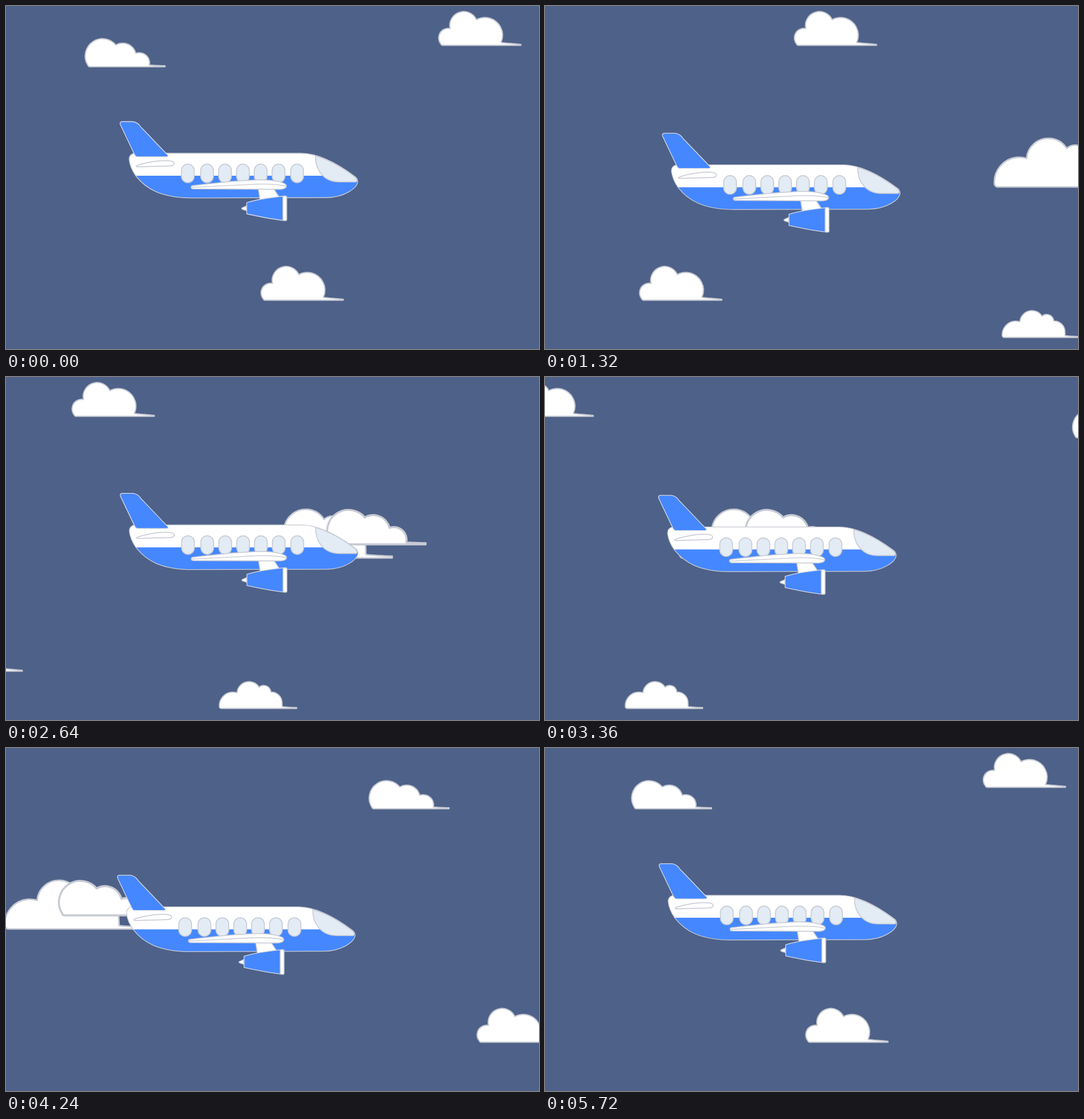
Write an HTML page with a canvas that moves like this. It is 900 by 580 pixels and loops after 5.76 s.

```html
<!DOCTYPE html>
<html lang="en">
<head>
<meta charset="utf-8">
<title>Plane in the clouds</title>
<style>
  html, body { margin: 0; width: 100%; height: 100%; overflow: hidden; background: #4e6188; }
  canvas { display: block; }
</style>
</head>
<body>
<canvas id="stage" width="900" height="580"></canvas>
<script>
const ctx = document.getElementById('stage').getContext('2d');
const LOOP = 5760, STEP = 40, HALF = LOOP / 2;
const SKY = '#4e6188', BLUE = '#4587ff', GLASS = '#e3ebf4', LINE = '#c6cad3', WHITE = '#fff';

// Upper crossing point of two circles [x, y, r]
function crossing([x1, y1, r1], [x2, y2, r2]) {
  const d = Math.hypot(x2 - x1, y2 - y1);
  const ux = (x2 - x1) / d, uy = (y2 - y1) / d;
  const a = (r1 * r1 - r2 * r2 + d * d) / (2 * d);
  const h = Math.sqrt(r1 * r1 - a * a);
  return [x1 + a * ux + h * uy, y1 + a * uy - h * ux];
}

// A cloud is a row of bumps on a flat base, with a thin tail on the right
function cloudPath({ bumps, base, width, tailY, tailX, endAngle }) {
  const p = new Path2D();
  const [fx, fy, fr] = bumps[0];
  let angle = Math.PI - Math.asin((base - 2.5 - fy) / fr);
  bumps.forEach((b, i) => {
    const [x, y, r] = b;
    const next = bumps[i + 1];
    const q = next && crossing(b, next);
    p.arc(x, y, r, angle, q ? Math.atan2(q[1] - y, q[0] - x) : endAngle);
    if (q) angle = Math.atan2(q[1] - next[1], q[0] - next[0]);
  });
  p.lineTo(tailX, tailY);
  p.quadraticCurveTo(tailX + 4, tailY + 0.7, width - 1.5, base - 1.6);
  p.lineTo(width - 1.5, base);
  const left = fx - fr * Math.cos(Math.asin((base - 2.5 - fy) / fr));
  p.lineTo(left + 3, base);
  p.quadraticCurveTo(left + 1, base, left, base - 2.5);
  p.closePath();
  return p;
}

const tall = cloudPath({
  bumps: [[17, 46, 16.3], [43, 25, 23.6], [78.5, 41.5, 30]],
  base: 58.5, width: 141, tailX: 106, tailY: 53.7, endAngle: 0.41
});
const sloped = cloudPath({
  bumps: [[30, 30.7, 29.3], [64, 31.5, 22.8], [92, 42.5, 17.5]],
  base: 48.7, width: 137, tailX: 109, tailY: 45.7, endAngle: 0.18
});
const wide = cloudPath({
  bumps: [[24, 42, 23.2], [51, 21.5, 20.3], [76, 19.5, 12], [88.4, 37, 18.4]],
  base: 46.5, width: 133, tailX: 107, tailY: 43.3, endAngle: 0
});

// x is the place at time `at`; speeds in px per ms
const clouds = [
  { path: tall, x: 378.2, y: 8, at: 1500, speed: 0.2345, line: 2 },
  { path: tall, x: 430, y: 439, at: 0, speed: 0.2053, before: 0.24, line: 2 },
  { path: wide, x: 384.3, y: 514, at: 2560, speed: 0.312, line: 1.8 },
  { path: sloped, x: 133, y: 54, at: 0, speed: 0.3155, line: 2 },
  { path: wide, x: 330.1, y: 221.6, at: 2960, speed: 0.2605, line: 2.6, scale: 1.815 },
  { path: sloped, x: 365.8, y: 222.9, at: 3260, speed: 0.283, line: 3.4, scale: 1.235 }
];

function drawCloud({ path, x, y, at, speed, before = speed, line, scale = 1 }, t) {
  const u = (t - at + LOOP + HALF) % LOOP - HALF;
  ctx.save();
  ctx.translate(x - u * (u < 0 ? before : speed), y);
  ctx.scale(scale, scale);
  paint(path, WHITE, line / scale);
  ctx.restore();
}

function paint(path, fill, width = 1.5, stroke = LINE) {
  if (fill) {
    ctx.fillStyle = fill;
    ctx.fill(path);
  }
  ctx.lineWidth = width;
  ctx.strokeStyle = stroke;
  ctx.stroke(path);
}

const shape = d => new Path2D(d);
const body = shape('M217 249H498C530 249 566 271 590 289Q594 292 594 298C592 309 570 324 540 324' +
  'L316 324.6C262 325 236 309 219 287C212 277 209 268 208 260Q207.500 251 217 249Z');
const cockpit = shape('M522.500 253.500C522 278 537 297.500 563 297.500H591Q595 295 589 289C568 273 546 260 522.500 253.500Z');
const fin = shape('M196 195.500H212Q220 195.500 225 201Q228 205.500 232 209L273 252Q275 255 270 255' +
  'H222Q219 255 217 251L193 200.500Q191.500 196 196 195.500Z');
const stabilizer = shape('M222 269.500C235 265 255 261.500 268 261.500Q284 261.500 284 266Q284 270.500 276 270.500L222 272Q217.500 271.500 222 269.500Z');
const pylon = shape('M426 309H452L462 324L429 328Z');
const engine = shape('M406.500 332.500C420 328 445 324 468 321.500V362.500C445 360 420 354.500 406.500 351.500Z');
const nozzle = shape('M406 338L398.500 341.500Q397 342.500 399 343.700L406 346Z');
const wing = shape('M314 304C350 299.500 400 294.500 430 294C455 294 473.500 299 473.500 304C473.500 309 468 310 460 310L316 309.300Q312.500 309 312.500 306.500Q312.500 304.500 314 304Z');
const wingFold = shape('M314 306.700L420 301.300C445 300.500 462 302 473 304.500');
const intake = new Path2D();
intake.roundRect(467.5, 321.3, 6.5, 41.7, 2);
const windows = [307, 339.5, 369.8, 400, 430, 460.2, 491.5].map(x => {
  const p = new Path2D();
  p.roundRect(x - 10.8, 267.3, 21.6, 31.5, 10.8);
  return p;
});

function drawPlane(dx, dy) {
  ctx.save();
  ctx.translate(dx, dy);
  ctx.fillStyle = WHITE;
  ctx.fill(body);
  ctx.save();
  ctx.clip(body);
  ctx.fillStyle = BLUE;
  ctx.fillRect(200, 287, 400, 45);
  ctx.restore();
  paint(body, null, 1.3);
  paint(cockpit, GLASS);
  paint(fin, BLUE, 1.3, '#d2d8e4');
  paint(stabilizer, WHITE);
  windows.forEach(w => paint(w, GLASS));
  paint(pylon, WHITE);
  paint(nozzle, WHITE);
  paint(engine, BLUE, 1.3, '#d2d8e4');
  paint(intake, WHITE);
  paint(wing, WHITE);
  paint(wingFold, null, 1.3);
  ctx.restore();
}

// Cubic ease-in-out with handles at 0.42 and 0.58
function ease(p) {
  let lo = 0, hi = 1;
  for (let i = 0; i < 20; i++) {
    const s = (lo + hi) / 2;
    if (1.26 * s - 0.78 * s * s + 0.52 * s * s * s < p) lo = s; else hi = s;
  }
  return lo * lo * (3 - 2 * lo);
}

function draw(now) {
  const t = Math.floor(now / STEP) * STEP % LOOP;
  ctx.fillStyle = SKY;
  ctx.fillRect(0, 0, 900, 580);
  ctx.lineJoin = ctx.lineCap = 'round';
  clouds.forEach(c => drawCloud(c, t));
  // The plane sways right, then left, dipping each time
  const sway = ease(1 - Math.abs(t % HALF / (HALF / 2) - 1));
  drawPlane(sway * (t < HALF ? 5.6 : -4.5), sway * 19.8);
}

function tick() {
  draw(performance.now());
  requestAnimationFrame(tick);
}
tick();
</script>
</body>
</html>
```
